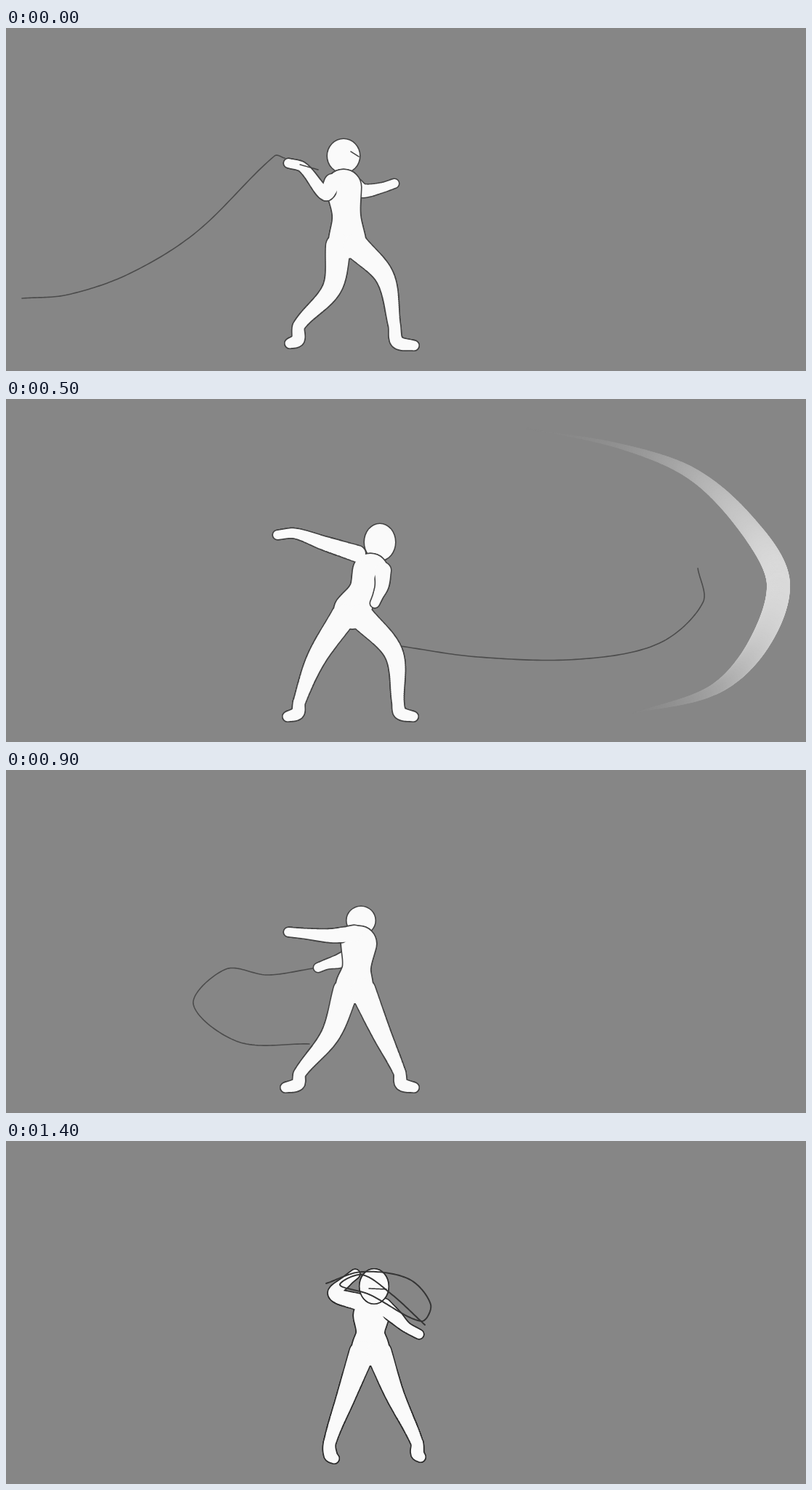
An HTML page with a canvas for the animation above (1.5 s loop, 1102 by 472 pixels).

```html
<!DOCTYPE html>
<html lang="en">
<head>
<meta charset="utf-8">
<title>Whip swing</title>
<style>
html, body { margin: 0; width: 100%; height: 100%; overflow: hidden; background: #868686; }
canvas { display: block; }
</style>
</head>
<body>
<canvas id="stage" width="1102" height="472"></canvas>
<script>
const STEP = 100, BG = '#868686', SKIN = '#fafafa', INK = 1.6;
const RADII = { spine: [24, 19, 25], leg: [17, 12.5, 8, 8.5, 6.5], arm: [11, 9, 6.5, 6] };
const ctx = document.getElementById('stage').getContext('2d');

// pts(x, y, x, y, ...) -> [[x, y], ...]
const pts = (...n) => n.length ? [n.slice(0, 2), ...pts(...n.slice(2))] : [];

// Key poses. head: centre and radii; spine: chest, waist, hips;
// legs: knee, ankle, toe; arms: shoulder, elbow, wrist, hand.
const wind = {
  head: [465, 176, 22, 23], spine: pts(465, 219, 469, 258, 470, 292),
  legB: pts(449, 358, 404, 409, 391, 434), legF: pts(522, 343, 535, 409, 562, 437),
  armW: pts(450, 212, 440, 228, 409, 192, 389, 186), armO: pts(480, 217, 492, 224, 517, 220, 535, 214),
  whip: pts(384, 179, 370, 176, 262, 281, 170, 338, 85, 367, 22, 372),
  marks: [pts(475, 170, 486, 177), pts(405, 188, 430, 195)], back: 'armO'
};
const raise = {
  head: [461, 175, 21, 23], spine: pts(465, 221, 465, 258, 469, 290),
  legB: pts(447, 349, 405, 408, 391, 434), legF: pts(524, 345, 535, 410, 562, 437),
  armW: pts(460, 206, 494, 165, 496, 125, 495, 101), armO: pts(446, 215, 441, 240, 443, 250, 447, 252),
  whip: pts(523, 109, 440, 100, 380, 124, 330, 180, 285, 242, 238, 297), back: 'armO', thin: true
};
const strike = {
  head: [515, 197, 21, 25], spine: pts(502, 237, 492, 264, 477, 291),
  legB: pts(427, 358, 404, 417, 388, 437), legF: pts(534, 350, 540, 418, 561, 437),
  armW: pts(519, 236, 518, 256, 512, 272, 508, 281), armO: pts(484, 213, 437, 198, 398, 185, 374, 187),
  whip: pts(543, 340, 650, 355, 790, 358, 900, 336, 960, 280, 953, 233)
};
const follow = {
  head: [489, 196, 19.5, 20], spine: pts(488, 234, 482, 266, 479, 293),
  legB: pts(447, 364, 405, 417, 385, 437), legF: pts(517, 362, 542, 416, 562, 437),
  armW: pts(475, 250, 458, 256, 442, 261, 428, 264), armO: pts(480, 219, 448, 221, 410, 220, 388, 218),
  whip: pts(426, 264, 360, 286, 325, 320, 385, 364, 480, 380, 589, 380), back: 'armW'
};
const settle = {
  ...follow, head: [489, 207, 19.5, 19], spine: pts(486, 239, 483, 272, 480, 296),
  armW: pts(475, 256, 459, 263, 443, 267, 430, 272), armO: pts(480, 225, 448, 228, 410, 225, 389, 223),
  whip: pts(423, 273, 360, 282, 303, 274, 258, 322, 320, 374, 418, 377)
};
const gather = {
  head: [503, 203, 20.5, 22], spine: pts(499, 246, 490, 280, 487, 302),
  legB: pts(518, 360, 470, 400, 480, 437), legF: pts(510, 365, 494, 408, 515, 434),
  armW: pts(513, 236, 523, 262, 523, 273, 515, 283), armO: pts(490, 245, 488, 260, 490, 268, 492, 275),
  whip: pts(462, 319, 410, 353, 345, 376, 305, 362, 292, 345, 289, 330),
  back: 'armO', crossed: true, ink: '#2c2c2c'
};
const coil = {
  head: [507, 200, 19.5, 23.5], spine: pts(503, 240, 502, 264, 502, 284),
  legB: pts(469, 350, 446, 415, 452, 437), legF: pts(535, 348, 566, 415, 571, 435),
  armW: pts(487, 222, 453, 210, 470, 192, 481, 183), armO: pts(520, 228, 537, 243, 551, 256, 569, 266),
  whip: pts(441, 196, 490, 180, 555, 190, 585, 225, 572, 248, 500, 211, 460, 198, 490, 184, 530, 210, 577, 253),
  marks: [pts(500, 203, 524, 204)], facing: true, ink: '#2c2c2c'
};

const mix = (a, b, u) => Array.isArray(a) ? a.map((v, i) => mix(v, b[i], u)) : a + (b - a) * u;

function between(a, b, u, extra) {
  const pose = { ...(u < 0.5 ? a : b), marks: [] };
  for (const k of ['head', 'spine', 'legB', 'legF', 'armW', 'armO', 'whip']) pose[k] = mix(a[k], b[k], u);
  return { ...pose, ...extra };
}

const poses = [
  wind,
  between(wind, raise, 0.5, {
    armW: pts(452, 208, 430, 175, 438, 145, 442, 128),
    whip: pts(462, 132, 410, 132, 350, 172, 270, 262, 220, 300, 130, 338)
  }),
  raise,
  between(raise, strike, 0.33, {
    armW: pts(480, 208, 512, 182, 555, 155, 577, 145),
    whip: pts(594, 145, 574, 148, 500, 75, 430, 60, 370, 75, 320, 110)
  }),
  between(raise, strike, 0.67, {
    armW: pts(510, 225, 540, 235, 563, 250, 578, 254),
    whip: pts(580, 254, 670, 170, 730, 115, 800, 75, 870, 65, 920, 80)
  }),
  { ...strike, swoosh: true },
  between(strike, follow, 0.5, { whip: pts(470, 280, 432, 325, 480, 360, 560, 372, 700, 380, 947, 350) }),
  follow,
  between(follow, settle, 0.5),
  settle,
  between(settle, gather, 0.5, { whip: pts(455, 280, 350, 284, 260, 305, 243, 330, 265, 362, 330, 374) }),
  gather,
  between(gather, coil, 0.33, { whip: pts(512, 286, 470, 300, 438, 311, 422, 295, 428, 270) }),
  between(gather, coil, 0.67, {
    armW: coil.armW,
    whip: pts(475, 190, 520, 171, 580, 185, 605, 220, 590, 255, 550, 245, 470, 205)
  }),
  coil
];

// Smooth curve through points of any dimension, with tangents scaled to the spacing
function spline(p, n = 24) {
  const gap = i => p[i] && p[i + 1] ? Math.hypot(p[i + 1][0] - p[i][0], p[i + 1][1] - p[i][1]) || 1 : 0;
  const slope = (i, c) => {
    const a = p[i - 1] || p[i], b = p[i + 1] || p[i];
    return (b[c] - a[c]) / (gap(i - 1) + gap(i));
  };
  const out = [];
  for (let i = 0; i < p.length - 1; i++)
    for (let k = 0; k < n; k++) {
      const t = k / n, s = t * t * (3 - 2 * t), len = gap(i);
      out.push(p[i].map((v, c) => v + (p[i + 1][c] - v) * s +
        len * t * (1 - t) * ((1 - t) * slope(i, c) - t * slope(i + 1, c))));
    }
  return [...out, p[p.length - 1]];
}

const tube = (joints, radii) => spline(joints.map((j, i) => [...j, radii[i]]));

// Fill a tube as one union of discs
function fillTube(discs, color, grow = 0) {
  ctx.beginPath();
  for (const [x, y, r] of discs) {
    ctx.moveTo(x + r + grow, y);
    ctx.arc(x, y, r + grow, 0, 2 * Math.PI);
  }
  ctx.fillStyle = color;
  ctx.fill();
}

function line(points, color, width) {
  ctx.beginPath();
  spline(points).forEach(q => ctx.lineTo(...q));
  ctx.strokeStyle = color;
  ctx.lineWidth = width;
  ctx.stroke();
}

function leg([hx, hy], side, [knee, ankle, toe]) {
  const heel = [ankle[0] + 0.15 * (toe[0] - ankle[0]), toe[1] - 5];
  return tube([[hx + 12 * side, hy + 8], knee, ankle, heel, toe], RADII.leg);
}

function drawHead([x, y, rx, ry], ink) {
  ctx.beginPath();
  ctx.ellipse(x, y, rx, ry, 0, 0, 2 * Math.PI);
  ctx.strokeStyle = ink;
  ctx.lineWidth = INK * 2;
  ctx.stroke();
  ctx.fillStyle = SKIN;
  ctx.fill();
}

function drawSwoosh() {
  const path = spline(pts(715, 40, 850, 66, 950, 106, 1030, 185, 1064, 255, 1035, 340, 975, 400, 862, 433), 60);
  path.forEach(([x, y], i) => {
    const glow = Math.max(0, Math.sin(Math.PI * (i / (path.length - 1)) ** 1.25));
    const shade = Math.round(mix(134, 250, 0.72 * glow ** 1.5));
    fillTube([[x, y, 1 + 15 * glow ** 1.3]], `rgb(${shade},${shade},${shade})`);
  });
}

function draw(pose) {
  const ink = pose.ink || '#444';
  const hips = pose.spine[2];
  const body = {
    spine: tube(pose.spine, RADII.spine),
    legB: leg(hips, -1, pose.legB), legF: leg(hips, 1, pose.legF),
    armW: tube(pose.armW, RADII.arm), armO: tube(pose.armO, RADII.arm)
  };
  const whip = () => line(pose.whip, pose.facing ? '#353535' : pose.thin ? '#666' : '#4c4c4c',
    pose.facing ? 2 : pose.thin ? 1 : 1.6);
  const legs = pose.crossed ? ['legF', 'legB'] : ['legB', 'legF'];
  const arms = ['armO', 'armW'].filter(k => k !== pose.back);

  ctx.fillStyle = BG;
  ctx.fillRect(0, 0, 1102, 472);
  ctx.lineCap = ctx.lineJoin = 'round';
  if (pose.swoosh) drawSwoosh();
  if (!pose.facing) whip();
  drawHead(pose.head, ink);
  for (const k in body) fillTube(body[k], ink, INK);
  if (pose.back) fillTube(body[pose.back], SKIN);
  fillTube(body.spine, ink, INK);
  fillTube(body.spine, SKIN);
  // Limbs leave the body without a seam; their ink starts past the root.
  for (const k of [...legs, ...arms]) {
    fillTube(body[k].slice(14), ink, INK);
    fillTube(body[k], SKIN);
  }
  if (pose.facing) {
    drawHead(pose.head, ink);
    whip();
  }
  for (const m of pose.marks || []) line(m, ink, 1.5);
}

let shown = -1;
const start = performance.now();
function tick() {
  const i = Math.floor((performance.now() - start) / STEP) % poses.length;
  if (i !== shown) draw(poses[shown = i]);
  requestAnimationFrame(tick);
}
tick();
</script>
</body>
</html>
```
